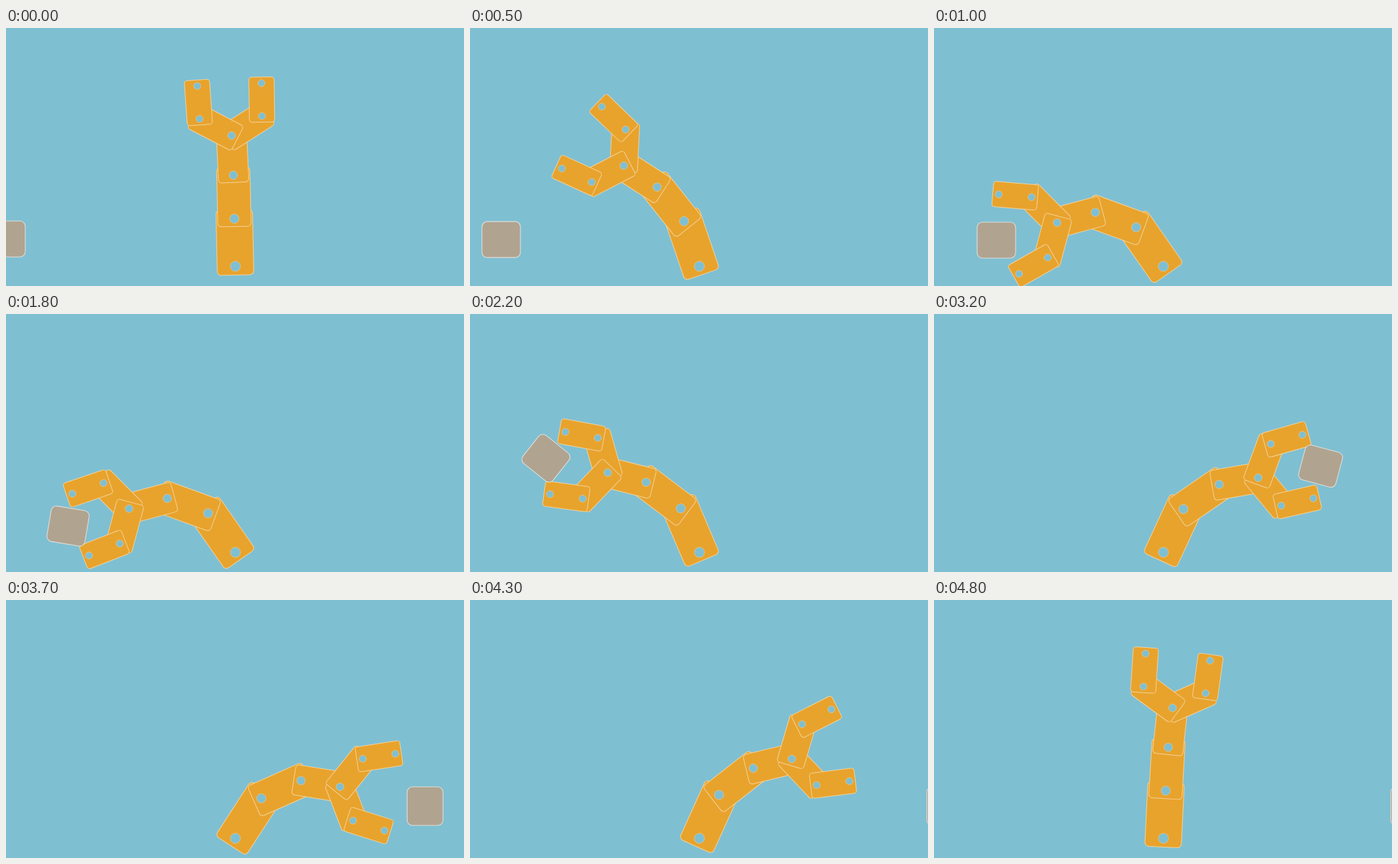
Recreate the animation shown at these times as an HTML page. Size 690x388 px, loop 4.9 s.

```html
<!DOCTYPE html>
<html lang="en">
<head>
<meta charset="utf-8">
<title>Robot arm</title>
<style>
  html, body { margin: 0; width: 100%; height: 100%; overflow: hidden; background: #7fbfd2; }
  svg { display: block; width: 690px; height: 388px; }
  .plate { fill: #e8a32d; stroke: #f2d49c; stroke-width: 1; }
  .hole { fill: #7fbfd2; stroke: #e6cfa0; stroke-width: .6; }
  .box { fill: #b0a491; stroke: #e2dfd8; stroke-width: 1.1; }
</style>
</head>
<body>
<svg id="stage" viewBox="0 0 690 388"></svg>
<script>
const LOOP = 4900, STEP = 100;
const LEAD = 35; // the arm passes its rest pose this long before the loop restarts
const BASE = { x: 345.6, y: 358.4 };
const SHRINK = 0.912; // each link is a smaller copy of the one below
const SPREAD = 60;
const GRASP = { reach: 95.6, angle: -0.9, turn: 114.5 };
const GRAB = 1800, RELEASE = 3400;

// bend: every arm joint; left, right: finger tips (degrees)
const rest = { bend: 0, left: 59, right: -59 };
const reach = { bend: -35, left: 45.5, right: -40.2 };
const grab = { bend: -35, left: 53.8, right: -63.8 };
const carry = { bend: 33, left: 53.8, right: -63 };
const release = { bend: 33, left: 42.3, right: -51.4 };
const TIMELINE = [
  [0, rest], [995, reach], [1035, reach], [1835, grab], [1985, grab],
  [3405, carry], [3735, release], [4135, release], [LOOP, rest]
];

const stage = document.getElementById("stage");
const mix = (a, b, k) => a + (b - a) * k;
const ramp = (t, from, to) => Math.min(1, Math.max(0, (t - from) / (to - from)));
const ease = k => (1 - Math.cos(Math.PI * k)) / 2;

function add(parent, tag, attrs) {
  const node = document.createElementNS("http://www.w3.org/2000/svg", tag);
  for (const name in attrs) node.setAttribute(name, attrs[name]);
  return parent.appendChild(node);
}

// A link points up from its pivot at the origin.
function makeLink(level) {
  const scale = SHRINK ** level;
  const length = 71.7 * scale, half = 27.5 * scale, end = 13.1 * scale;
  const group = add(stage, "g", {});
  add(group, "rect", { class: "plate", x: -half, y: -length - end, width: 2 * half, height: length + 2 * end, rx: 6 * scale });
  for (const cy of [0, -length]) add(group, "circle", { class: "hole", cy, r: 7.6 * scale });
  return { group, length };
}

const arm = [0, 1, 2].map(makeLink);
const [rightArm, leftArm, rightTip, leftTip] = [3, 3, 4, 4].map(makeLink);
const box = add(stage, "rect", { class: "box", x: -29, y: -27, width: 58, height: 54, rx: 8 });

function along(p, angle, length) {
  const a = angle * Math.PI / 180;
  return { x: p.x + length * Math.sin(a), y: p.y - length * Math.cos(a) };
}

function put(node, p, angle) {
  node.setAttribute("transform", `translate(${p.x.toFixed(2)} ${p.y.toFixed(2)}) rotate(${angle.toFixed(2)})`);
}

function place(link, p, angle) {
  put(link.group, p, angle);
  return along(p, angle, link.length);
}

function poseAt(t) {
  const next = TIMELINE.findIndex(([time]) => time > t);
  const [from, a] = TIMELINE[next - 1], [to, b] = TIMELINE[next];
  const k = ramp(t, from, to);
  const outer = mix(a.bend, b.bend, k), middle = mix(a.bend, b.bend, ease(k));
  return {
    joints: [outer, middle, outer],
    left: mix(a.left, b.left, k),
    right: mix(a.right, b.right, k)
  };
}

function placeBox(t, wrist, angle) {
  if (t < GRAB) {
    const k = ramp(t, 0, 1000);
    put(box, { x: 94 * k, y: mix(317.3, 319, k) }, 9.4 * ramp(t, 1600, GRAB));
  } else if (t < RELEASE) {
    put(box, along(wrist, angle + GRASP.angle, GRASP.reach), angle + GRASP.turn);
  } else {
    put(box, { x: mix(597, 715.3, ramp(t, 3475, 4250)), y: 310 }, 90);
  }
}

function draw(t) {
  const { joints, left, right } = poseAt((t + LEAD) % LOOP);
  let p = BASE, angle = 0;
  arm.forEach((link, i) => {
    angle += joints[i];
    p = place(link, p, angle);
  });
  const rightAngle = angle + SPREAD, leftAngle = angle - SPREAD;
  place(rightTip, place(rightArm, p, rightAngle), rightAngle + right);
  place(leftTip, place(leftArm, p, leftAngle), leftAngle + left);
  placeBox(t, p, angle);
}

const start = performance.now();
function tick() {
  const t = (performance.now() - start + 8) % LOOP;
  draw(Math.floor(t / STEP) * STEP);
  requestAnimationFrame(tick);
}
tick();
</script>
</body>
</html>
```
